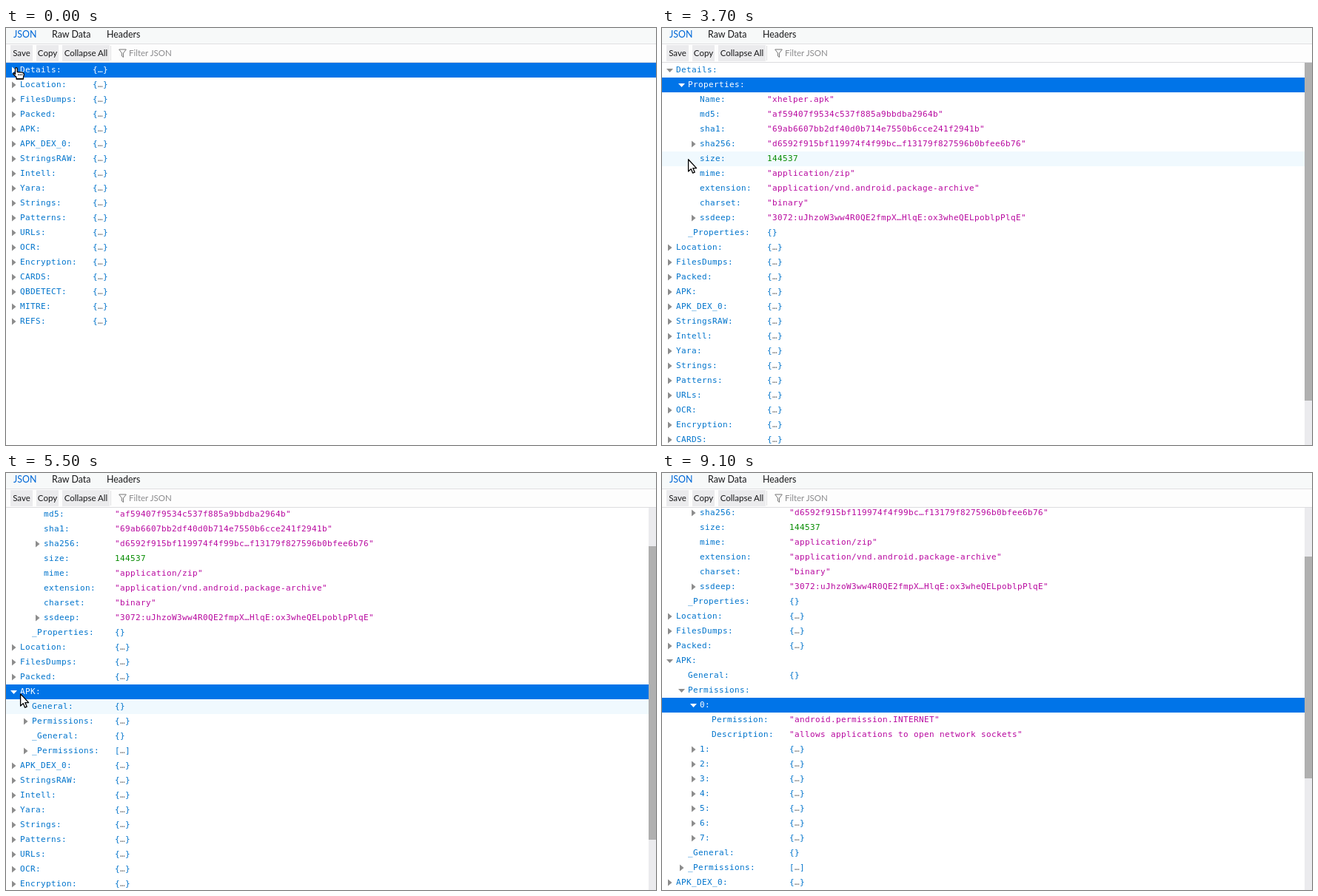
An HTML page for the animation above (9.9 s loop, 878x564 px).

```html
<!DOCTYPE html>
<html lang="en">
<head>
<meta charset="utf-8">
<title>JSON viewer</title>
<style>
html, body { margin: 0; width: 100%; height: 100%; overflow: hidden; background: #fff; }
body { position: relative; }
body * { position: absolute; box-sizing: border-box; white-space: pre; }
.ui { font-family: Lato, "Open Sans", sans-serif; color: #18181a; }
.ui span { top: 0; }
#tabs { left: 0; top: 0; width: 100%; height: 22px; background: #f7f9f9; border-bottom: 1px solid #e0e0e2; font-size: 12.4px; line-height: 17px; }
#tabs .on { color: #0068d8; }
#bar { left: 0; top: 22px; width: 100%; height: 25px; background: #fdfdfd; border-bottom: 1px solid #dcdcdf; font-size: 11.5px; line-height: 24px; }
#bar b { top: 1px; height: 22px; line-height: 22px; background: #ebebed; font-weight: normal; text-align: center; }
#bar i { left: 141px; top: 2px; width: 1px; height: 20px; background: #e0e0e2; }
#bar span { left: 166px; color: #8b8b8d; }
#view { left: 0; top: 47px; width: 878px; height: 517px; overflow: hidden; font: 11px/20px "DejaVu Sans Mono", monospace; }
#rows { left: 0; top: 0; width: 100%; }
.row { left: 0; width: 100%; height: 20px; color: #0074cc; }
.row em { position: static; font-style: normal; color: #737373; }
.row u { position: static; }
.row .str { color: #b8089f; }
.row .num { color: #058b00; }
.row svg { top: 5px; width: 10px; height: 10px; fill: #8c8c8c; }
.hover { background: #f0f9fe; }
.sel { background: #0074e8; }
.sel, .sel * { color: #fff !important; fill: #fff !important; }
#track { right: 0; top: 0; width: 10px; height: 100%; background: #ebebee; }
#thumb { left: 0; width: 10px; background: #b0b0b0; }
#cursor { left: 0; top: 0; width: 20px; height: 24px; overflow: visible; fill: #fff; stroke: #000; stroke-width: 1.3; stroke-linejoin: round; }
</style>
</head>
<body>
<div id="tabs" class="ui">
  <span class="on" style="left:10px">JSON</span><span style="left:62px">Raw Data</span><span style="left:136px">Headers</span>
</div>
<div id="bar" class="ui">
  <b style="left:6px;width:30px">Save</b><b style="left:41px;width:30px">Copy</b><b style="left:76px;width:64px">Collapse All</b><i></i>
  <svg style="left:152px;top:6px" width="11" height="13" fill="none" stroke="#777"><path d="M.7 1H10.3L6.5 6V11.5L4.5 10V6Z"/></svg>
  <span>Filter JSON</span>
</div>
<div id="view"><div id="rows"></div><div id="track"><div id="thumb"></div></div></div>
<svg id="cursor">
  <path id="arrow" d="M.6.8V17L4.2 13.6 6.6 19.2 9.2 18.1 6.8 12.6H11.6Z"/>
  <g id="hand"><path d="M3.5 9.5V2Q3.5.6 4.8.6T6.2 2V6.5L13 7.2Q15.4 7.8 15.4 10L14.4 13.5V16H5V13.5L1 9.5Q.3 8 1.7 7.8Z"/><path d="M5 15.6H14.4M8 9.5V11M10.3 9.5V11M12.5 9.5V11" fill="none"/></g>
</svg>
<script>
const LOOP = 9900, STEP = 100, TOP = 47, TRACK = 517, ROW = 20, CHAR = 7, LEAVE = 9100;
const $ = id => document.getElementById(id);
const OBJ = '{…}';

// Row: depth, label, value, time shown, time clicked open
const rows = [];
const add = (depth, label, value = OBJ, shown = 0, opened = Infinity) =>
  rows.push({ depth, label, value, shown, opened, folds: value.includes('…') });
const group = names => names.split(' ').forEach(n => add(0, n));

add(0, 'Details', OBJ, 0, 500);
add(1, 'Properties', OBJ, 500, 2000);
Object.entries({
  Name: '"xhelper.apk"',
  md5: '"af59407f9534c537f885a9bbdba2964b"',
  sha1: '"69ab6607bb2df40d0b714e7550b6cce241f2941b"',
  sha256: '"d6592f915bf119974f4f99bc…f13179f827596b0bfee6b76"',
  size: '144537',
  mime: '"application/zip"',
  extension: '"application/vnd.android.package-archive"',
  charset: '"binary"',
  ssdeep: '"3072:uJhzoW3ww4R0QE2fmpX…HlqE:ox3wheQELpoblpPlqE"'
}).forEach(([k, v]) => add(2, k, v, 2000));
add(1, '_Properties', '{}', 500);
group('Location FilesDumps Packed');
add(0, 'APK', OBJ, 0, 5200);
add(1, 'General', '{}', 5200);
add(1, 'Permissions', OBJ, 5200, 6400);
add(2, '0', OBJ, 6400, 7400);
add(3, 'Permission', '"android.permission.INTERNET"', 7400);
add(3, 'Description', '"allows applications to open network sockets"', 7400);
for (let i = 1; i < 8; i++) add(2, i + '', OBJ, 6400);
add(1, '_General', '{}', 5200);
add(1, '_Permissions', '[…]', 5200);
group('APK_DEX_0 StringsRAW Intell Yara Strings Patterns URLs OCR Encryption CARDS QBDETECT MITRE REFS');

// Cursor moves: first step, last step, destination
const moves = [
  [0, 200, 11, 53], [500, 1200, 25, 78], [2400, 2600, 43, 126], [2700, 3000, 36, 164],
  [3700, 4200, 27, 244], [4300, 4600, 23, 298], [4800, 4900, 18, 292], [5500, 6100, 27, 331],
  [6600, 7200, 44, 354], [8000, 8000, 50, 355], [8900, 9000, 54, 362]
];

// Position, and the time the cursor last moved
function cursorAt(t) {
  let x = 8, y = 53, moved = 0;
  for (const [a, b, tx, ty] of moves) {
    if (t < a) break;
    const k = Math.min(1, (t - a + STEP) / (b - a + STEP));
    x += (tx - x) * k;
    y += (ty - y) * k;
    moved = Math.min(t, b);
  }
  return { x: Math.round(x), y: Math.round(y), moved };
}

const glide = (t, start) => 1 - (1 - Math.min(1, Math.max(0, (t - start) / 400))) ** 2;
const scrollAt = t => Math.round(61 * glide(t, 4200) + 42 * glide(t, 7400));

function rowHtml(r, i, t, col, state, underline) {
  const open = t >= r.opened, x = 16 * r.depth;
  const toggle = r.folds
    ? `<svg style="left:${6 + x}px"><path d="${open ? 'M0 3H9L4.5 8Z' : 'M2 .5L7.5 5 2 9.5Z'}"/></svg>` : '';
  const label = underline ? `<u>${r.label}</u>` : r.label;
  const kind = r.value[0] === '"' ? 'str' : /^\d/.test(r.value) ? 'num' : '';
  const text = kind ? r.value : r.value.replace('…', '<em>…</em>');
  return `<div class="row ${state}" style="top:${i * ROW}px">${toggle}<span style="left:${19 + x}px">${label}:</span>` +
    (open ? '' : `<span class="${kind}" style="left:${col}px">${text}</span>`) + '</div>';
}

function drawScrollbar(scroll, height) {
  const extra = height - TRACK - 2;
  $('track').style.display = extra > 0 ? '' : 'none';
  const ratio = 510 / (height - 60);
  $('thumb').style.height = Math.round(TRACK - extra * ratio) + 'px';
  $('thumb').style.top = Math.round(scroll * ratio) + 'px';
}

function draw(t) {
  const list = rows.filter(r => t >= r.shown);
  const col = Math.max(...list.map(r => 40 + 16 * r.depth + CHAR * (r.label.length + 1)));
  const scroll = scrollAt(t), { x, y, moved } = cursorAt(t);
  const inside = t < LEAVE;

  // The last opened row is selected; hover changes only when the cursor moves
  const sel = list.reduce((best, r) =>
    r.opened <= t && !(best.opened <= t && best.opened > r.opened) ? r : best, list[0]);
  const over = inside ? list[Math.floor((y + 8 + scrollAt(moved) - TOP) / ROW)] : null;
  const reach = over && over.folds ? x + 4 - 16 * over.depth : 0;
  const hand = reach >= 6, onLabel = reach >= 19;

  $('rows').innerHTML = list.map((r, i) => {
    const state = r === sel ? 'sel' : r === over ? 'hover' : '';
    return rowHtml(r, i, t, col, state, r === over && onLabel);
  }).join('');
  $('rows').style.top = -scroll + 'px';
  drawScrollbar(scroll, list.length * ROW);

  $('cursor').style.transform = `translate(${x}px,${y}px)`;
  $('cursor').style.display = inside ? '' : 'none';
  $('arrow').style.display = hand ? 'none' : '';
  $('hand').style.display = hand ? '' : 'none';
}

// Snap the monospace advance to whole pixels
const ctx = document.createElement('canvas').getContext('2d');
ctx.font = '11px "DejaVu Sans Mono", monospace';
$('view').style.letterSpacing = CHAR - ctx.measureText('0').width + 'px';

let last = -1;
function tick() {
  const t = Math.floor(performance.now() % LOOP / STEP) * STEP;
  if (t !== last) draw(last = t);
  requestAnimationFrame(tick);
}
tick();
</script>
</body>
</html>
```
